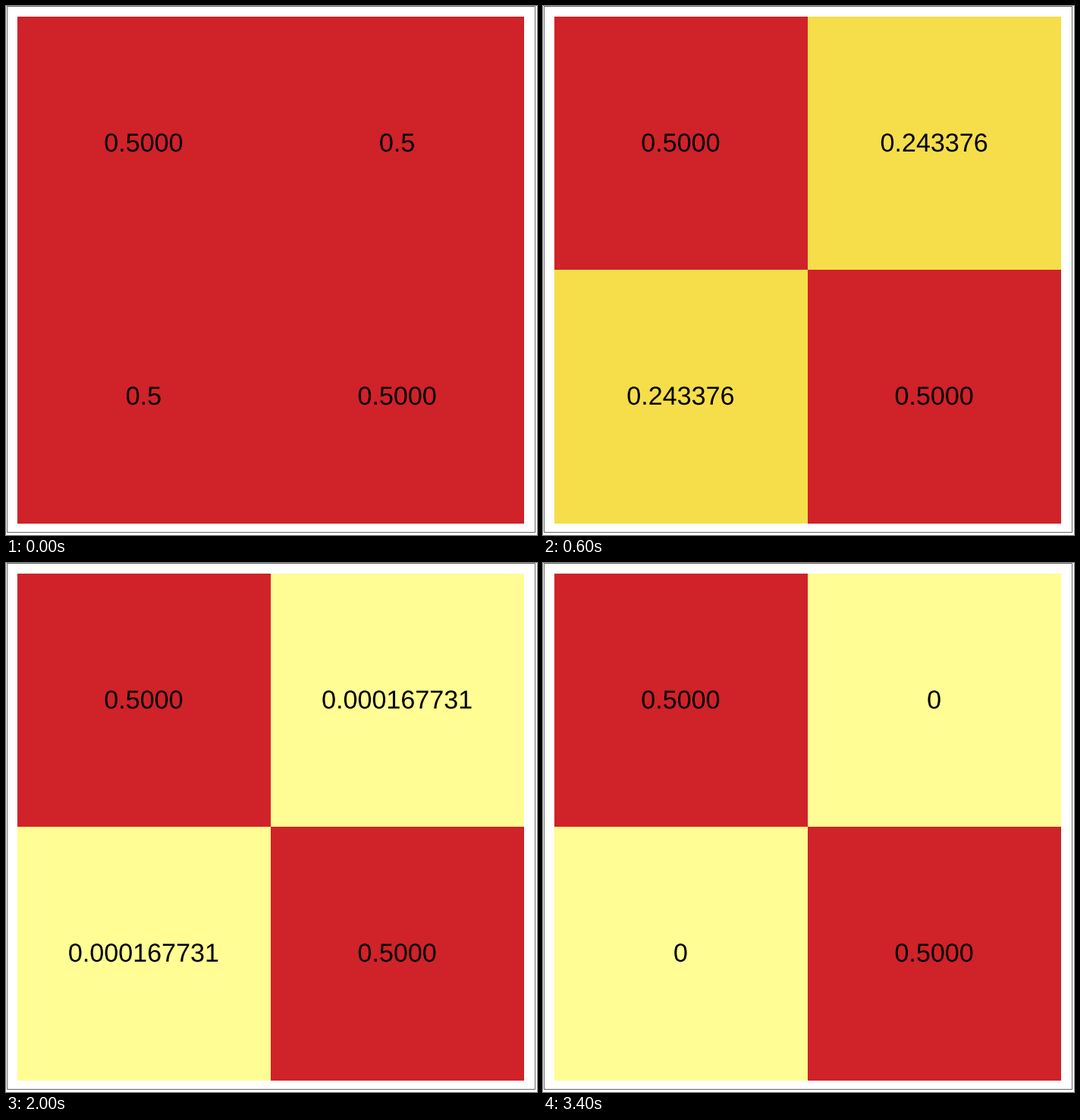
A matplotlib script for the animation above (5100 ms loop, 700 px wide and 698 px high).

```python
import math

import numpy as np
import matplotlib.pyplot as plt
from matplotlib.animation import FuncAnimation
from matplotlib.patches import PathPatch, Rectangle
from matplotlib.path import Path
from matplotlib.textpath import TextPath
from matplotlib.transforms import Affine2D

W, H, DPI = 700, 698, 64
PT = 72 / DPI  # points per pixel
SIZE, SUP = 34.1, 24.0
ADVANCE = {".": 0.278, "\u2212": 0.584}
LEFT, RIGHT = 181.4, 515.6
TOP, BOTTOM = 192, 526
RED = (208 / 255, 34 / 255, 41 / 255)

# colour scale from pale yellow (0) to red (1)
STOPS = np.array([0, 0.48675, 0.72615, 1])
COLORS = np.array([(255, 253, 147), (246, 222, 74),
                   (235, 184, 67), (208, 34, 41)]) / 255
SLOPES = np.gradient(COLORS, STOPS, axis=0)


def blend(s):
    """Cubic Hermite interpolation along the colour stops."""
    i = min(np.searchsorted(STOPS, s, side="right") - 1, len(STOPS) - 2)
    h = STOPS[i + 1] - STOPS[i]
    u = (s - STOPS[i]) / h
    c = ((1 + 2 * u) * (1 - u) ** 2 * COLORS[i]
         + u * (1 - u) ** 2 * h * SLOPES[i]
         + u * u * (3 - 2 * u) * COLORS[i + 1]
         + u * u * (u - 1) * h * SLOPES[i + 1])
    return tuple(np.clip(c, 0, 1))


def width(text, size):
    return size * sum(ADVANCE.get(ch, 0.556) for ch in text)


def glyphs(text, x, y, size):
    """Outlines of text with its baseline starting at pixel (x, y)."""
    paths = []
    for ch in text:
        p = TextPath((0, 0), ch, size=size, prop={"family": "Liberation Sans"})
        paths.append(Affine2D().scale(1, -1).translate(x, y).transform_path(p))
        x += width(ch, size)
    return paths


def cross(x, y, r=5.9, w=1.45):
    """Multiplication sign as two thick diagonal bars."""
    bar = np.array([(-r, -w), (r, -w), (r, w), (-r, w), (-r, -w)]) * (1.3, 1)
    return [Affine2D().rotate_deg(a).translate(x, y).transform_path(
        Path(bar, closed=True)) for a in (45, 225 - 90)]


def plain(text, cx, y):
    return glyphs(text, cx - width(text, SIZE) / 2, y, SIZE)


def scientific(mantissa, exponent, cx, y):
    wm, w10 = width(mantissa, SIZE), width("10", SIZE)
    sup = f"\u2212{-exponent}"
    gap = 27.4
    x = cx - 1.8 - (wm + gap + w10 + 0.9 + width(sup, SUP)) / 2
    y += 4
    paths = glyphs(mantissa, x, y, SIZE) + cross(x + wm + 14, y - 8.3)
    x += wm + gap
    paths += glyphs("10", x, y, SIZE)
    return paths + glyphs(sup, x + w10 + 0.9, y - 16, SUP)


def number(v, cx, y):
    """Six significant digits, scientific below 1e-5."""
    if v == 0:
        return plain("0", cx, y)
    e = math.floor(math.log10(v))
    if e < -5:
        return scientific(f"{v / 10 ** e:.5f}".rstrip("0"), e, cx, y)
    return plain(f"{v:.{5 - e}f}".rstrip("0"), cx, y)


fig = plt.figure(figsize=(W / DPI, H / DPI), dpi=DPI, facecolor="white")
ax = fig.add_axes([0, 0, 1, 1])
ax.set_xlim(0, W)
ax.set_ylim(H, 0)
ax.axis("off")


def cell(x0, y0, x1, y1):
    return ax.add_patch(Rectangle((x0, y0), x1 - x0, y1 - y0, facecolor=RED,
                                  linewidth=0, antialiased=False))


def label(paths):
    return ax.add_patch(PathPatch(Path.make_compound_path(*paths),
                                  facecolor="black", linewidth=0, zorder=3))


ax.add_patch(Rectangle((1.5, 0.5), 696, 694, fill=False, edgecolor="#666666",
                       linewidth=PT, snap=False))
cell(15, 14, 349, 348)
cell(349, 348, 683, 683)
off_cells = [cell(349, 14, 683, 348), cell(15, 348, 349, 683)]
label(plain("0.5000", LEFT, TOP))
label(plain("0.5000", RIGHT, BOTTOM))
off_spots = [(RIGHT, TOP), (LEFT, BOTTOM)]
off_labels = [label(number(0.5, *spot)) for spot in off_spots]


def draw(i):
    t = i / 10
    v = 0.5 * math.exp(-2 * t * t)
    if v < 1e-10:
        v = 0
    color = blend(2 * v)
    for box, text, spot in zip(off_cells, off_labels, off_spots):
        box.set_facecolor(color)
        text.set_path(Path.make_compound_path(*number(v, *spot)))
    return off_cells + off_labels


anim = FuncAnimation(fig, draw, frames=51, interval=100, repeat=True,
                     repeat_delay=0, blit=False)
plt.show()
```
